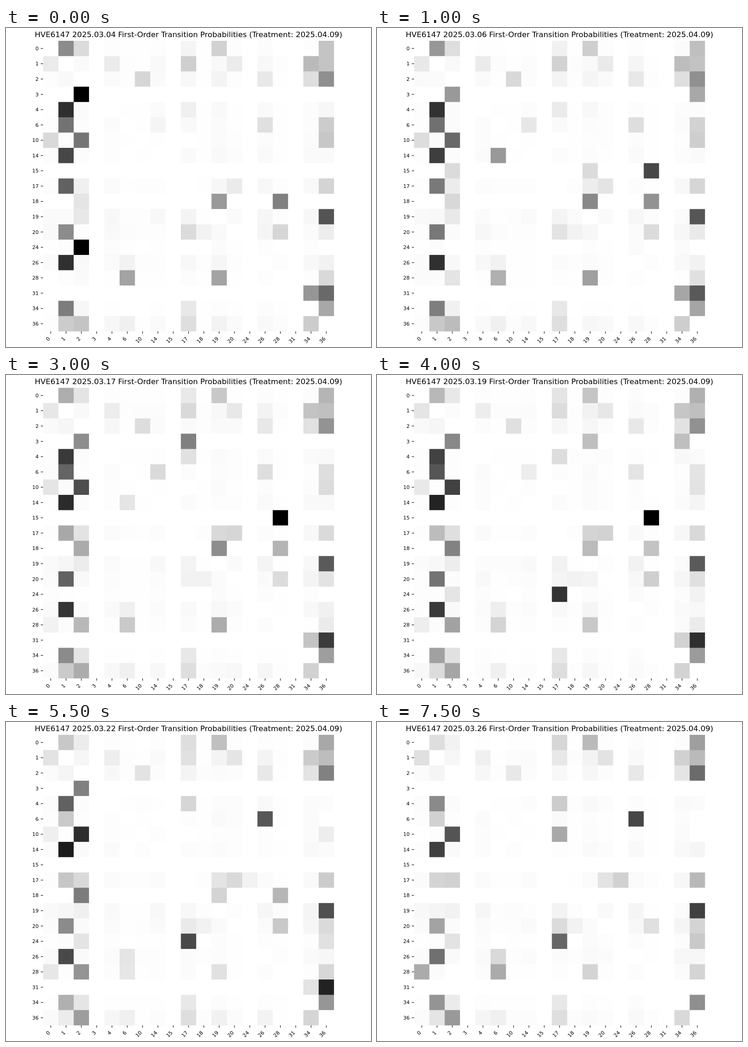
An HTML page with a canvas that plays this animation: 800 px wide and 700 px high, repeating every 8000 ms.

```html
<!DOCTYPE html>
<html lang="en">
<head>
<meta charset="utf-8">
<title>Transition probabilities</title>
<style>
  html, body { margin: 0; width: 100%; height: 100%; overflow: hidden; background: #fff; }
  canvas { display: block; }
</style>
</head>
<body>
<canvas id="stage" width="800" height="700"></canvas>
<script>
const ctx = document.getElementById('stage').getContext('2d');
const FONT = '"DejaVu Sans", sans-serif';
const STATES = [0, 1, 2, 3, 4, 6, 10, 14, 15, 17, 18, 19, 20, 24, 26, 28, 31, 34, 36];
const LEFT = 81.25, TOP = 28.1, CELL = 33.56, SIDE = CELL * STATES.length;
const STEP = 500, STEPS = 16, LAST = STEPS - 1;

// Faint background: how widely a state scatters times how much a state attracts, in percent
const SPREAD = { 0: .3, 1: 1, 2: .8, 4: .5, 6: .4, 10: .3, 14: .5, 17: .6, 19: 1, 20: .8, 24: .3, 26: .7, 28: .3, 34: .2, 36: 1 };
const PULL = { 0: 2, 1: 4, 2: 3, 4: 3, 6: 1, 10: 1, 14: 2, 17: 4, 18: 1, 19: 4, 20: 2, 26: 4, 28: 1, 34: 4, 36: 6 };

// Strong links: key percentages spread evenly over the steps first..last
const links = {};
function link(from, targets, first = 0, last = LAST) {
  for (const to in targets) {
    (links[from + '>' + to] ??= []).push({ keys: targets[to], first, last });
  }
}

link(0, { 1: [45, 13], 2: [14, 5], 17: [4, 16], 19: [18, 27], 36: [23, 38] });
link(1, { 0: [8, 12], 4: [8, 6], 17: [19, 9], 20: [8, 11], 34: [27, 18], 36: [23, 27] });
link(2, { 10: [16, 9], 26: [9], 34: [13, 10], 36: [44, 42, 58] });
link(3, { 2: [100] }, 0, 1);
link(3, { 2: [40, 50] }, 2, 11);
link(3, { 36: [34, 67] }, 2, 4);
link(3, { 17: [50] }, 6, 6);
link(3, { 19: [25], 34: [25] }, 8, 10);
link(4, { 1: [82, 76, 46], 17: [6, 20] });
link(6, { 1: [55, 58, 72], 14: [4, 18, 0], 26: [12, 14, 8], 36: [20, 8] }, 0, 10);
link(6, { 1: [21, 18], 26: [66, 72] }, 11);
link(10, { 0: [15, 4], 2: [54, 72, 90], 36: [22, 3] }, 0, 14);
link(10, { 2: [67], 17: [34] }, 15);
link(14, { 1: [72, 85, 93] }, 0, 14);
link(14, { 1: [75] }, 15);
link(14, { 6: [40, 10, 10] }, 2, 6);
link(15, { 2: [14], 19: [14], 28: [72] }, 2, 2);
link(15, { 28: [100] }, 5, 10);
link(17, { 1: [62, 27, 17], 2: [6, 18], 19: [3, 18, 2], 20: [8, 18, 11], 36: [17, 14, 28] });
link(17, { 24: [3, 6, 18] }, 9);
link(18, { 2: [10, 22, 60, 36], 19: [40, 56, 15, 20], 28: [50, 33, 20, 44] }, 0, 14);
link(19, { 2: [9, 5], 36: [67, 64, 75] });
link(20, { 1: [45, 65, 48, 36], 17: [14, 3, 14], 18: [5], 28: [16, 11, 24, 12], 36: [7, 17] });
link(24, { 2: [100] }, 0, 0);
link(24, { 18: [100] }, 4, 4);
link(24, { 2: [10, 11], 17: [80, 60], 36: [5, 21] }, 8);
link(26, { 1: [81, 81, 75, 56], 6: [5, 6, 15] });
link(28, { 0: [0, 6, 12], 2: [2, 22, 42, 42], 6: [36, 24, 14, 1], 19: [36, 40, 14, 8], 36: [15, 8, 8, 30] }, 0, 14);
link(28, { 0: [33], 6: [33], 19: [17], 36: [17] }, 15);
link(31, { 34: [41, 20, 4], 36: [59, 80, 92] }, 0, 14);
link(34, { 1: [51, 50, 28, 42], 2: [3, 12, 8], 17: [9], 36: [34, 44] });
link(36, { 1: [20, 24, 7, 10], 2: [23, 31, 38, 40], 6: [6], 17: [13], 34: [20, 15] });

function along(keys, p) {
  const pos = p * (keys.length - 1);
  const i = Math.min(Math.floor(pos), keys.length - 2);
  return i < 0 ? keys[0] : keys[i] + (keys[i + 1] - keys[i]) * (pos - i);
}

function random(seed) {
  const s = Math.sin(seed * 12.9898) * 43758.5453;
  return s - Math.floor(s);
}

function percent(from, to, step) {
  const spans = links[from + '>' + to];
  if (spans) {
    const span = spans.find(s => step >= s.first && step <= s.last);
    return span ? along(span.keys, (step - span.first) / (span.last - span.first || 1)) : 0;
  }
  if (from === to) return 0;
  const jitter = 0.4 + random(from * 41 + to + step * 0.37);
  return (SPREAD[from] || 0) * (PULL[to] || 0) * jitter;
}

// Ink is added up on black, then inverted, so shared cell edges blend without seams
function drawCells(step) {
  ctx.fillStyle = '#000';
  ctx.fillRect(0, 0, 800, 700);
  ctx.globalCompositeOperation = 'lighter';
  STATES.forEach((from, r) => STATES.forEach((to, c) => {
    const ink = Math.round(2.55 * percent(from, to, step));
    if (!ink) return;
    ctx.fillStyle = `rgb(${ink},${ink},${ink})`;
    ctx.fillRect(LEFT + c * CELL, TOP + r * CELL, CELL, CELL);
  }));
  ctx.globalCompositeOperation = 'difference';
  ctx.fillStyle = '#fff';
  ctx.fillRect(0, 0, 800, 700);
  ctx.globalCompositeOperation = 'source-over';
}

function drawAxes() {
  ctx.fillStyle = '#000';
  ctx.font = `11.11px ${FONT}`;
  ctx.textAlign = 'right';
  STATES.forEach((state, i) => {
    const mid = (i + 0.5) * CELL, x = LEFT + mid, y = TOP + mid;
    ctx.fillRect(LEFT - 5, y - 0.55, 5, 1.1);
    ctx.fillText(state, LEFT - 9.7, y + 4);
    ctx.fillRect(x - 0.55, TOP + SIDE, 1.1, 5);
    ctx.save();
    ctx.translate(x - 0.8, TOP + SIDE + 16.8);
    ctx.rotate(-Math.PI / 4);
    ctx.fillText(state, 0, 0);
    ctx.restore();
  });
}

function drawTitle(step) {
  const day = String(step < 4 ? 4 + step : 11 + step).padStart(2, '0');
  ctx.font = `16.667px ${FONT}`;
  ctx.textAlign = 'center';
  ctx.fillText(`HVE6147 2025.03.${day} First-Order Transition Probabilities (Treatment: 2025.04.09)`, 400, 20);
}

let shown = -1;
function tick(now) {
  const step = Math.floor(now / STEP) % STEPS;
  if (step !== shown) {
    shown = step;
    drawCells(step);
    drawAxes();
    drawTitle(step);
  }
  requestAnimationFrame(tick);
}
tick(0);
</script>
</body>
</html>
```
